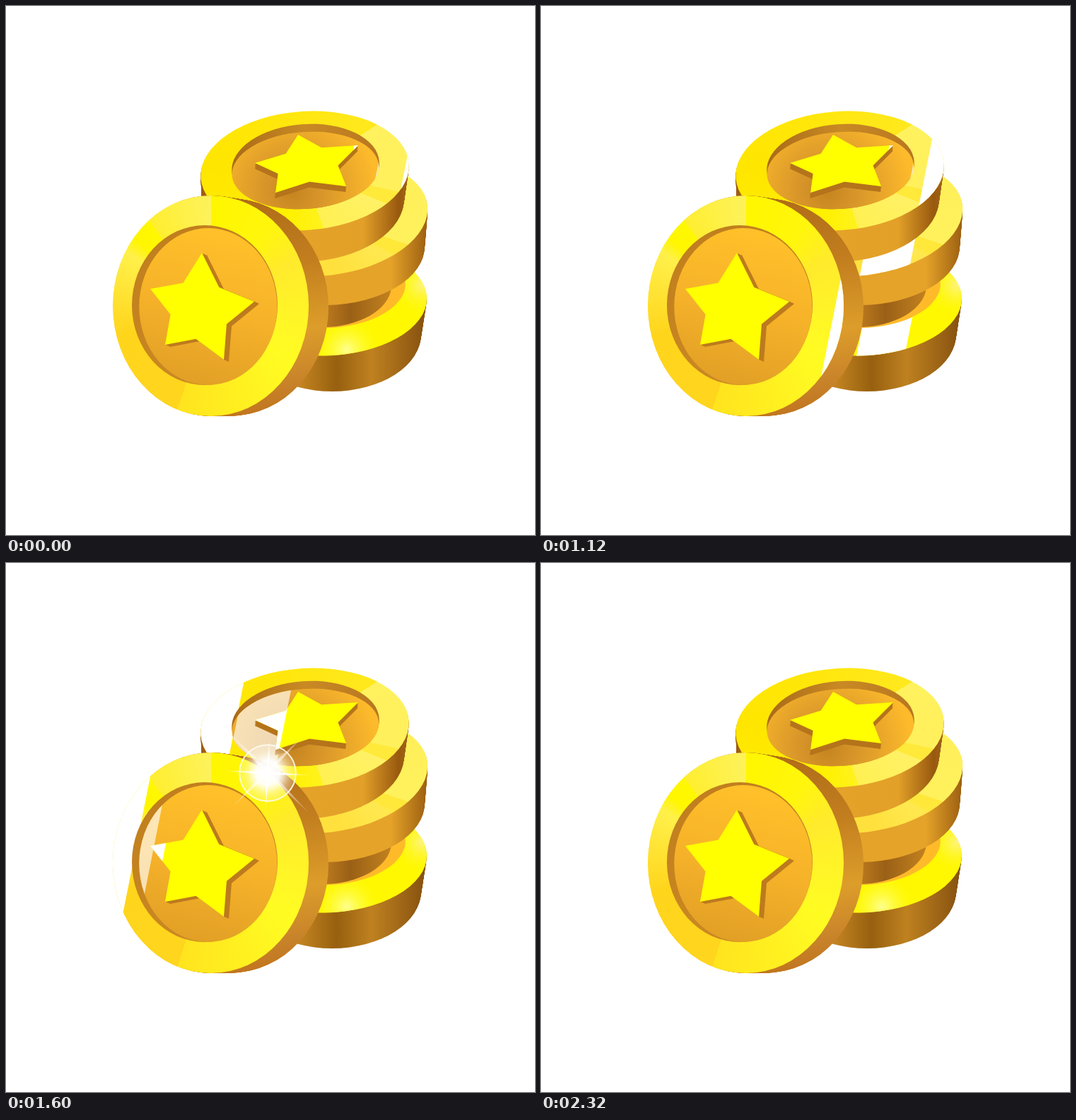
An HTML page with a canvas that plays this animation: 748x748 px, repeating every 3.2 s.

```html
<!DOCTYPE html>
<html lang="en">
<head>
<meta charset="utf-8">
<title>Gold coins</title>
<style>
  html, body { margin: 0; width: 100%; height: 100%; overflow: hidden; background: #fff; }
  canvas { display: block; }
</style>
</head>
<body>
<canvas id="stage" width="748" height="748"></canvas>
<script>
const ctx = document.getElementById('stage').getContext('2d');
const LOOP = 3200, STEP = 80, SLANT = -0.2, BAND = 68;
const clamp = v => Math.max(0, Math.min(1, v));
const degrees = a => a * Math.PI / 180;

// Gradients take their stops as "offset colour, offset colour, ..."
function withStops(gradient, text) {
  for (const stop of text.split(',')) {
    const [offset, color] = stop.trim().split(' ');
    gradient.addColorStop(+offset, color);
  }
  return gradient;
}
const linear = (x0, y0, x1, y1, text) => withStops(ctx.createLinearGradient(x0, y0, x1, y1), text);
const radial = (x, y, r, text) => withStops(ctx.createRadialGradient(x, y, 0, x, y, r), text);
const conic = (x, y, text) => withStops(ctx.createConicGradient(0, x, y), text);

function oval(x, y, rx, ry = rx, tilt = 0) {
  const path = new Path2D();
  path.ellipse(x, y, rx, ry, degrees(tilt), 0, 2 * Math.PI);
  return path;
}
function polygon(points) {
  return new Path2D('M' + points + 'Z');
}
function fill(path, style) {
  ctx.fillStyle = style;
  ctx.fill(path);
}

// Five tips; each notch lies between two tips, pulled towards the centre
function star(...tips) {
  const center = [0, 1].map(k => tips.reduce((sum, tip) => sum + tip[k], 0) / 5);
  return polygon(tips.flatMap((tip, i) => {
    const next = tips[(i + 1) % 5];
    return [...tip, ...center.map((c, k) => c + .69 * ((tip[k] + next[k]) / 2 - c))];
  }));
}

// Edge of a coin, swept from the back oval to the front one
function sweep(from, to, style) {
  const n = 50;
  for (let i = 0; i < n; i++) {
    fill(oval(...from.map((v, k) => v + (to[k] - v) * i / n)), style);
  }
}

function extrude(path, dx, dy, style) {
  for (let i = 8; i > 0; i--) {
    ctx.save();
    ctx.translate(dx * i / 8, dy * i / 8);
    fill(path, style);
    ctx.restore();
  }
}

// Quadratic motion to the left: speeding up after, or slowing down until, a time
const speedUp = (t, x, after, pull) => x - pull * (Math.max(0, t - after) / 640) ** 2;
const slowDown = (t, x, until, pull) => x + pull * (Math.max(0, until - t) / 640) ** 2;

// Slanted white band inside a shape; left is its edge at y = 300
function glint(path, left, width = BAND, alpha = 1) {
  const top = left - 300 * SLANT, bottom = left + 448 * SLANT;
  ctx.save();
  ctx.clip(path);
  ctx.globalAlpha = alpha;
  fill(polygon([top, 0, top + width, 0, bottom + width, 748, bottom, 748]), '#fff');
  ctx.restore();
}

function bottomCoin(t) {
  const top = [449, 415.5, 146, 79, -1], base = [461, 464, 126, 81, 0];
  sweep(base, top, linear(413, 0, 595, 0, '0 #c58622, .3 #97600f, .57 #bf8120, 1 #85500f'));
  const rim = oval(...top);
  fill(rim, '#fff800');
  fill(rim, radial(482, 486, 50, '0 #ffff90, 1 #fff80000'));
  fill(rim, radial(588, 395, 45, '0 #fff47c, 1 #fff80000'));
  glint(rim, speedUp(t, 620, 480, 135));

  const recess = oval(460, 399, 105, 56, -4);
  fill(recess, '#ffba2a');
  ctx.save();
  ctx.clip(recess);
  fill(oval(455, 400, 90, 54, -4), linear(455, 0, 545, 0, '0 #b8771d, .35 #9a6016, 1 #c3821f'));
  ctx.restore();
}

function middleCoin(t) {
  const top = [451, 299, 146, 82, -7], base = [452, 342, 140, 81, -1];
  sweep(base, top, linear(440, 0, 600, 0, '0 #e5a329, .65 #e5a329, 1 #96590f'));
  const rim = oval(...top);
  fill(rim, conic(451, 299, '0 #fff15c, .05 #fff15c, .05 #ffe83a, .075 #ffe83a, .085 #ffe850, .21 #ffe03c, 1 #fff15c'));
  glint(rim, speedUp(t, 602, 480, 135));
}

function topCoin(t) {
  const top = [422.5, 233, 147.5, 84, -4], base = [420, 276, 143, 86, -2];
  sweep(base, top, linear(275, 0, 570, 0, '0 #9a5a12, .1 #b87420, .45 #e5a329, .78 #e2a028, .95 #98590f, 1 #a5651a'));
  const rim = oval(...top);
  fill(rim, conic(422, 233,
    '0 #fff05c, .035 #fff05c, .035 #ffe93a, .06 #ffe93a, .06 #fff164, .2 #fff052, .2 #fff21c, .3 #fff100, .5 #ffe600, .91 #ffe81c, .91 #fff25e, 1 #fff05c'));
  glint(rim, speedUp(t, 550, 960, 308));

  fill(oval(423.5, 227, 104.5, 60, -4), linear(319, 0, 528, 0, '0 #a96a18, .5 #c98a24, 1 #b87620'));
  const face = oval(423.3, 232.5, 104, 54.5, -4);
  fill(face, radial(405, 262, 120, '0 #c68420, .35 #d8962a, 1 #fdba2b'));
  glint(face, speedUp(t, 511, 1280, 800), BAND, .65);

  const emblem = star([413, 182], [498, 197], [481, 255], [381, 264], [352, 222]);
  extrude(emblem, -.5, 8, '#b5741b');
  fill(emblem, '#ff0');
  glint(emblem, speedUp(t, 472, 1280, 800), 107);
}

function frontCoin(t) {
  const front = [289.5, 424, 138.5, 156, 0], back = [318, 426, 138, 153.5, 0];
  sweep(back, front, linear(350, 270, 390, 580, '0 #b06c18, .3 #c17d1e, .62 #dd9d2a, .85 #c8832a, 1 #c0731c'));
  const rim = oval(...front);
  fill(rim, conic(290, 424,
    '0 #fff328, .1 #fffc22, .3 #ffe41e, .3 #ffd51e, .45 #ffd51c, .59 #fff04a, .615 #fff600, .65 #fff800, ' +
    '.65 #ffee30, .75 #fdf25c, .75 #fff600, .85 #fff60c, .92 #ffea2c, 1 #fff328'));
  glint(rim, slowDown(t, 80, 1900, 243), 71);

  fill(oval(281, 423, 103, 113), linear(200, 330, 300, 530, '0 #c07e1e, 1 #cc8a22'));
  const face = oval(285.8, 425, 97.5, 111);
  fill(face, linear(310, 325, 260, 530, '0 #ffc02a, .5 #f6b229, 1 #e2a026'));
  glint(face, slowDown(t, -30, 2160, 250), BAND, .65);

  const emblem = star([277, 349], [351, 418], [308, 500], [225, 479], [204, 400]);
  extrude(emblem, 7, 3, '#bd7b1e');
  fill(emblem, '#ff0');
  glint(emblem, slowDown(t, -96, 2160, 250), 150);
}

// Four needles, crossing at right angles
function rays(x, y, length, angle, alpha = 1) {
  if (length < 1) return;
  const points = [];
  for (let i = 0; i < 8; i++) {
    const a = degrees(angle + i * 45);
    const r = length * (i % 2 ? .055 : i % 4 ? .8 : 1);
    points.push(x + r * Math.cos(a), y + r * Math.sin(a));
  }
  ctx.globalAlpha = alpha;
  fill(polygon(points), radial(x, y, length, '0 #fff, .4 #ffffffe0, 1 #ffffff30'));
  ctx.globalAlpha = 1;
}

function sparkle(t) {
  if (t < 1360 || t >= 2320) return;
  const x = 370, y = 297;
  const glow = 38 * clamp(Math.min((t - 1280) / 220, (2320 - t) / 400));
  fill(oval(x, y, glow), radial(x, y, glow, '0 #fff, .45 #fffffff0, .7 #fffbe890, 1 #fff8d000'));

  const ring = 27 + (t - 1440) * .08;
  ctx.globalAlpha = clamp((1760 - t) / 160);
  fill(oval(x, y, ring), radial(x, y, ring, '0 #ffffff60, .7 #ffffff10, 1 #ffffff40'));
  ctx.strokeStyle = '#fffdf0e0';
  ctx.lineWidth = 2;
  ctx.stroke(oval(x, y, ring));
  ctx.globalAlpha = 1;

  rays(x, y, 60 - Math.abs(t - 1600) * .14, 3);
  rays(x, y - 2, Math.min((t - 1360) * .35, 128, (2320 - t) * .32), 45, clamp((t - 1360) / 400));
}

function draw(now) {
  const t = Math.floor(now % LOOP / STEP) * STEP;
  ctx.fillStyle = '#fff';
  ctx.fillRect(0, 0, 748, 748);
  bottomCoin(t);
  middleCoin(t);
  topCoin(t);
  frontCoin(t);
  sparkle(t);
}

let start;
function tick(now) {
  start ??= now;
  draw(now - start);
  requestAnimationFrame(tick);
}
draw(0);
requestAnimationFrame(tick);
</script>
</body>
</html>
```
